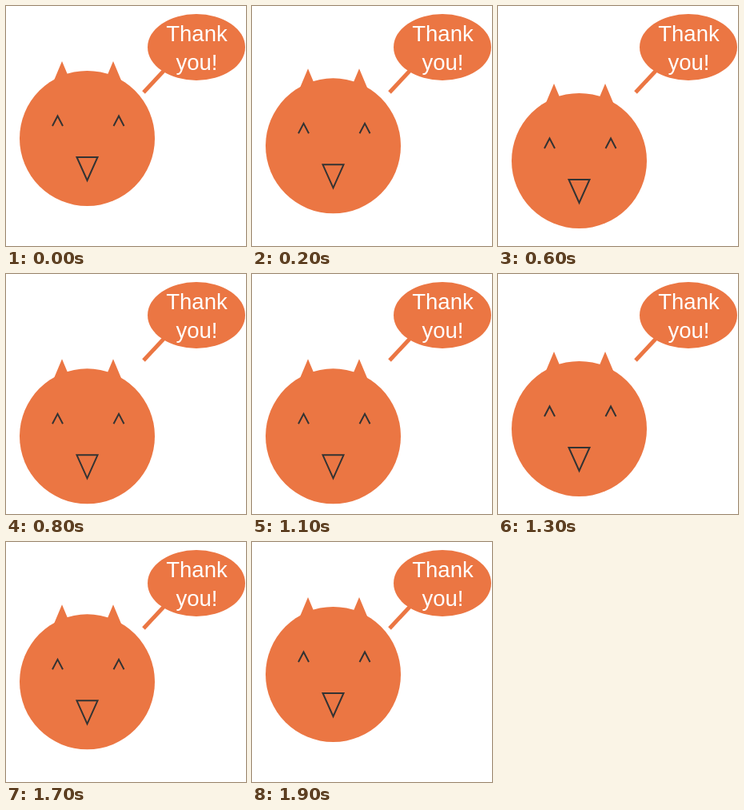
An HTML page that plays this animation: 300x300 px, repeating every 2 s.

```html
<!DOCTYPE html>
<html lang="en">
<head>
<meta charset="utf-8">
<title>Thank you!</title>
<style>
  html, body { margin: 0; width: 100%; height: 100%; overflow: hidden; background: #fff; }
  svg { display: block; width: 100%; height: 100%; }
  .fill { fill: #eb7643; }
  .line { fill: none; stroke: #333; stroke-width: 2; }
  text { font: 27.5px "Liberation Sans", Arial, sans-serif; fill: #fff; text-anchor: middle; }
</style>
</head>
<body>
<svg viewBox="0 0 300 300">
  <path d="M172 108 200 78" stroke="#eb7643" stroke-width="5"/>
  <ellipse class="fill" cx="238" cy="51.5" rx="61" ry="41.5"/>
  <text x="238.5" y="44">Thank</text>
  <text x="238.5" y="80">you!</text>
  <g id="cat">
    <path class="fill" d="M70 69 57 100H83ZM134 69 121 100H147Z"/>
    <circle class="fill" cx="101.5" cy="165.5" r="84.5"/>
    <path class="line" d="M58 150 64.5 137.5 71 150M134.5 150 141 137.5 147.5 150M88.5 189H114.5L101.5 218Z"/>
  </g>
</svg>
<script>
  const cat = document.getElementById("cat");
  const STEP = 100, STEPS = 20, DROP = 42;

  // Nine even steps down, a one-step hold, then nine back up.
  function draw() {
    const n = Math.floor(performance.now() / STEP) % STEPS;
    const k = Math.min(n, STEPS - 1 - n);
    cat.setAttribute("transform", `translate(0 ${DROP * k / 9})`);
    requestAnimationFrame(draw);
  }
  draw();
</script>
</body>
</html>
```
